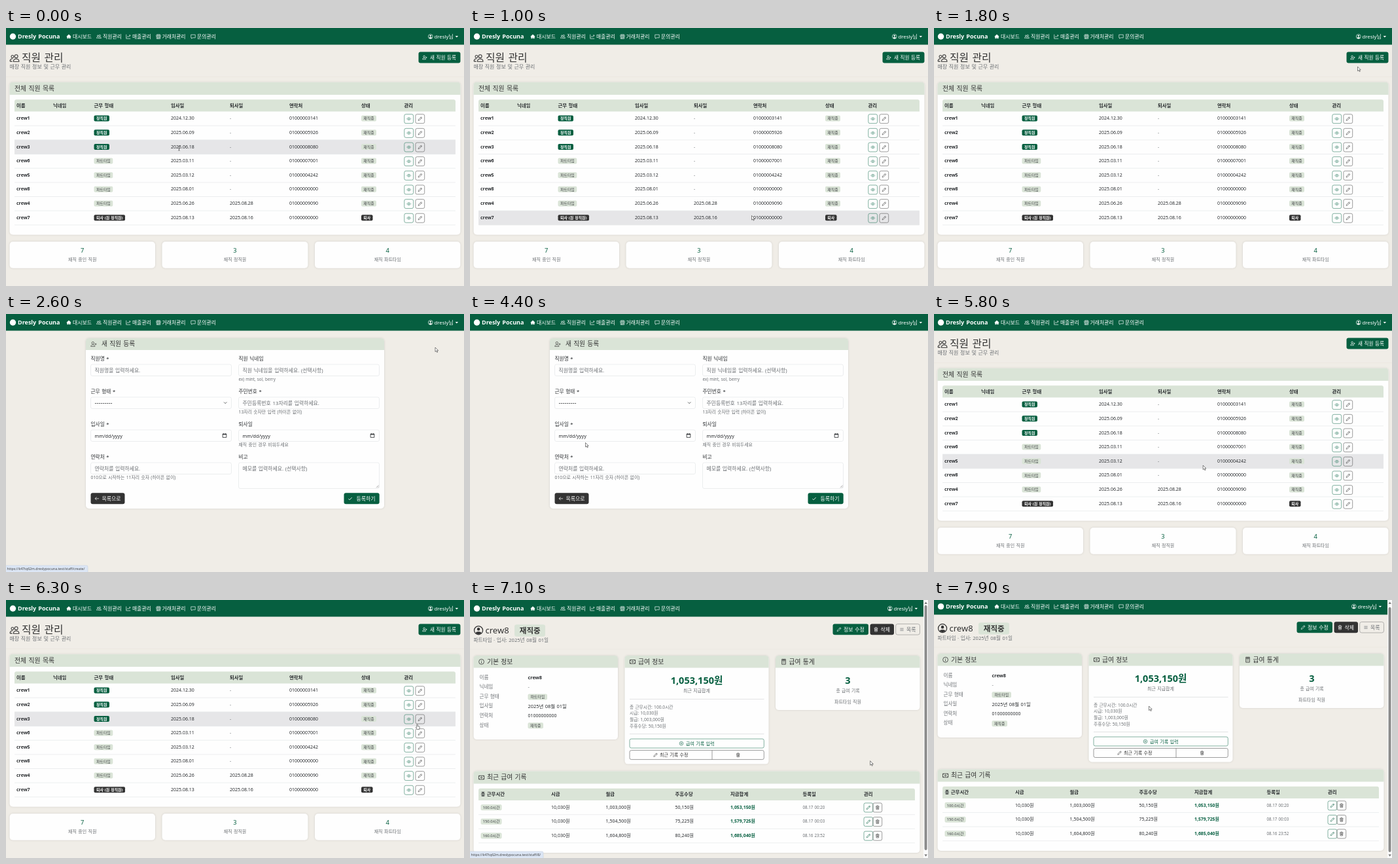
Recreate the animation shown at these times as an HTML page. Size 700 by 394 pixels, loop 8000 ms.

```html
<!DOCTYPE html>
<html lang="ko">
<head>
<meta charset="utf-8">
<title>직원 관리</title>
<style>
html,body{margin:0;height:100%;overflow:hidden;background:#f0ede7}
svg{display:block;width:100vw;height:100vh}
text{font-family:"Noto Sans","Noto Sans CJK KR",sans-serif;word-spacing:.08em;white-space:pre}
.card{filter:drop-shadow(0 .8px 1.8px rgba(0,0,0,.13))}
</style>
</head>
<body>
<svg id="stage" viewBox="0 0 700 394" xmlns="http://www.w3.org/2000/svg"></svg>
<script>
const GREEN = '#065f40', PALE = '#dae4d7', DARK = '#333', INK = '#292c2f', GRAY = '#6b6f73', LINE = '#dfe2e4', WHITE = '#fefefe';
const EDGE_GREEN = '#2f7d62', EDGE_GRAY = '#5c5c5c';
const BRAND = 'Dresly Pocuna', ACCOUNT = 'dresly', SITE = 'https://k47tq62m.dreslypocuna.test/staff/';
const ROW_TOP = 127.6, ROW_H = 21.65, MAX_SCROLL = 3.1;

// Icons on a 16-unit grid
const ICONS = {
  people: 'M8.2 5a2.6 2.6 0 1 0 5.2 0a2.6 2.6 0 1 0-5.2 0M6.2 13.5c0-5.6 9.2-5.6 9.2 0zM2.6 5.6a2.1 2.1 0 1 0 4.2 0a2.1 2.1 0 1 0-4.2 0M.6 13.2c0-3 1.6-4.2 4.4-4.2M.6 13.2h3.8',
  addUser: 'M3 5a3 3 0 1 0 6 0a3 3 0 1 0-6 0M.8 14c0-6 10.4-6 10.4 0zM13 5.5v5M10.5 8h5',
  ring: 'M.8 8a7.2 7.2 0 1 0 14.4 0a7.2 7.2 0 1 0-14.4 0',
  bust: 'M5.5 6a2.5 2.5 0 1 0 5 0a2.5 2.5 0 1 0-5 0M3 12.6c1-3.2 9-3.2 10 0q-5 4-10 0z',
  home: 'M1 8L8 1.5L15 8H13V14H9.5V10H6.5V14H3V8z',
  chart: 'M1 1v14h14M3 11l3.5-4 3 2.5L14 3.5M10.5 3.5H14V7',
  shop: 'M2.5 1.5h11l1.7 4v1.2H.8V5.5zM2 7v8h12V7M5 15v-5h3v5M10 10h2v2h-2zM5 2v4M8 2v4M11 2v4',
  chat: 'M1 2h14v10H6l-3 3v-3H1z',
  eye: 'M.8 8c3.5-6 10.9-6 14.4 0c-3.5 6-10.9 6-14.4 0zM5.8 8a2.2 2.2 0 1 0 4.4 0a2.2 2.2 0 1 0-4.4 0',
  pencil: 'M1.5 14.5l1-4L12 1l3 3-9.5 9.5zM10 3l3 3',
  trash: 'M1.5 3.5h13M5.5 3V1h5v2M3 3.5l.8 11.5h8.4L13 3.5M6 6v6.5M8 6v6.5M10 6v6.5',
  list: 'M2 4h12M2 8h12M2 12h12',
  info: 'M1 8a7 7 0 1 0 14 0a7 7 0 1 0-14 0M8 7v5M8 4v1.3',
  plus: 'M1 8a7 7 0 1 0 14 0a7 7 0 1 0-14 0M8 4.5v7M4.5 8h7',
  cash: 'M.8 3h14.4v10H.8zM6 8a2 2 0 1 0 4 0a2 2 0 1 0-4 0M1 6l2-3M15 10l-2 3M1 10l2 3M15 6l-2-3',
  calc: 'M3 1h10v14H3zM5 3h6v2.5H5zM5 8.5h1M7.5 8.5h1M10 8.5h1M5 11.5h1M7.5 11.5h1M10 11.5h1',
  back: 'M15 8H1.5M7 2.5L1.5 8L7 13.5',
  check: 'M2 8.5l4 4L14 4',
  down: 'M2 5l6 6 6-6',
  date: 'M2 3h12v11H2zM2 4.5h12M4.5 1v2M11.5 1v2M2 3.7h12'
};

const icon = (name, cx, cy, size, color, fill = 'none', weight = 1.4) =>
  `<path d="${ICONS[name]}" transform="translate(${cx - size / 2} ${cy - size / 2}) scale(${size / 16})" fill="${fill}" stroke="${color}" stroke-width="${weight}"/>`;
const userIcon = (cx, cy, size, color) => icon('ring', cx, cy, size, color) + icon('bust', cx, cy, size, 'none', color);
const text = (x, y, s, size = 7.4, fill = INK, weight = 400, anchor = 'start') =>
  `<text x="${x}" y="${y}" font-size="${size}" fill="${fill}" font-weight="${weight}" text-anchor="${anchor}">${s}</text>`;
const bold = (x, y, s, size = 7.4, fill = INK) => text(x, y, s, size, fill, 700);
const mid = (x, y, s, size, fill = GRAY, weight = 400) => text(x, y, s, size, fill, weight, 'middle');
const box = (x, y, x2, y2, fill, r = 0, stroke = 'none', extra = '') =>
  `<rect x="${x}" y="${y}" width="${x2 - x}" height="${y2 - y}" rx="${r}" fill="${fill}" stroke="${stroke}" stroke-width=".6" ${extra}/>`;
const rule = (x, x2, y, color = LINE) => `<path d="M${x} ${y}H${x2}" stroke="${color}" stroke-width=".6"/>`;
const topBar = (x, y, x2, y2, r) =>
  `<path d="M${x} ${y2}V${y + r}q0 ${-r} ${r} ${-r}H${x2 - r}q${r} 0 ${r} ${r}V${y2}z" fill="${PALE}"/>`;
const card = (x, y, x2, y2, headY) =>
  box(x, y, x2, y2, WHITE, 5, 'none', 'class="card"') + (headY ? topBar(x, y, x2, headY, 5) : '');
const iconButton = (x, cy, name, edge, color) =>
  box(x, cy - 7, x + 13.8, cy + 7, 'none', 2.4, edge) + icon(name, x + 6.9, cy, 6.6, color);

function badge(x, cy, x2, label, kind = 'pale') {
  const fill = { pale: PALE, green: GREEN, dark: DARK }[kind], pale = kind == 'pale';
  return box(x, cy - 4.6, x2, cy + 4.4, fill, 2) + mid((x + x2) / 2, cy + 2.1, label, 5.9, pale ? '#3c3f42' : '#fff', pale ? 500 : 700);
}

function nav(right) {
  const items = [['home', 96, 102, '대시보드'], ['people', 142, 148, '직원관리'], ['chart', 187, 193, '매출관리'], ['shop', 233, 238.5, '거래처관리'], ['chat', 286, 292, '문의관리']];
  return box(0, -4, 700, 25.5, GREEN) + '<circle cx="10.5" cy="13" r="4.7" fill="#fff"/>' +
    bold(18, 16.4, BRAND, 9, '#fff') +
    items.map(([name, cx, x, s]) => icon(name, cx, 13, 7.4, '#fff', name == 'home' ? '#fff' : 'none') + text(x, 15.9, s, 7.85, '#fff')).join('') +
    `<g transform="translate(${right} 0)">` + userIcon(648.8, 13, 7.6, '#fff') + text(654.5, 15.9, ACCOUNT + '님', 7.8, '#fff') +
    '<path d="M686.7 12h4.4l-2.2 2.4z" fill="#fff"/></g>';
}

function listPage() {
  const cols = [16, 72, 134.5, 252, 342, 433, 543, 608.5];
  const heads = ['이름', '닉네임', '근무 형태', '입사일', '퇴사일', '연락처', '상태', '관리'];
  const staff = [
    [1, 'full', '2024.12.30', '-', 3141], [2, 'full', '2025.06.09', '-', 5926],
    [3, 'full', '2025.06.18', '-', 8080], [6, 'part', '2025.03.11', '-', 7001],
    [5, 'part', '2025.03.12', '-', 4242], [8, 'part', '2025.08.01', '-', '0000'],
    [4, 'part', '2025.06.26', '2025.08.28', 9090], [7, 'left', '2025.08.13', '2025.08.16', '0000']];
  const types = { full: [158, '정직원', 'green'], part: [163.3, '파트타임', 'pale'], left: [182, '퇴사 (원 정직원)', 'dark'] };
  const rows = staff.map(([id, type, start, end, phone], i) => {
    const top = ROW_TOP + i * ROW_H, cy = top + 10.6, y = cy + 2;
    return rule(13, 687, top + ROW_H) + bold(16, y, 'crew' + id, 7) + badge(134.5, cy, ...types[type]) +
      text(252, y, start, 7) + text(342, y, end, 7, end == '-' ? GRAY : INK) + text(433, y, '0100000' + phone, 7) +
      (type == 'left' ? badge(543, cy, 560.5, '퇴사', 'dark') : badge(543, cy, 566, '재직중')) +
      iconButton(608.8, cy + .5, 'eye', EDGE_GREEN, EDGE_GREEN) + iconButton(625.9, cy + .5, 'pencil', EDGE_GRAY, DARK);
  }).join('');
  const stats = [[5.5, 228, 7, '재직 중인 직원'], [238.5, 461.5, 3, '재직 정직원'], [472, 694.5, 4, '재직 파트타임']];
  return rule(0, 700, 74.6, '#e7e4dd') + nav(0) + icon('people', 13, 46, 15, DARK, 'none', 1.1) + text(24, 51.3, '직원 관리', 15.8, DARK) +
    text(5.5, 62, '매장 직원 정보 및 근무 관리', 7.95, GRAY) +
    box(630.5, 36.5, 694.5, 53.4, GREEN, 3) + icon('addUser', 640, 45, 7.5, '#fff') + text(648, 47.8, '새 직원 등록', 7.6, '#fff') +
    card(5.5, 82.7, 694.5, 315.7, 102) + text(13, 95.6, '전체 직원 목록', 9.85, DARK) +
    topBar(13, 109.3, 687, ROW_TOP, 3) + heads.map((s, i) => bold(cols[i], 120.6, s)).join('') +
    box(13, ROW_TOP, 687, ROW_TOP + ROW_H, '#e6e6e8', 0, 'none', 'id="hover"') + rows +
    stats.map(([x, x2, n, s]) => card(x, 326.3, x2, 366.7) + mid((x + x2) / 2, 343, n, 9.3, GREEN) + mid((x + x2) / 2, 356.4, s, 7)).join('');
}

function formPage() {
  const fields = [
    ['직원명 *', '직원명을 입력하세요.', ''], ['직원 닉네임', '직원 닉네임을 입력하세요. (선택사항)', 'ex) mint, sol, berry'],
    ['근무 형태 *', '---------', ''], ['주민번호 *', '주민등록번호 13자리를 입력하세요.', '13자리 숫자만 입력 (하이픈 없이)'],
    ['입사일 *', 'mm/dd/yyyy', ''], ['퇴사일', 'mm/dd/yyyy', '재직 중인 경우 비워두세요'],
    ['연락처 *', '연락처를 입력하세요.', '010으로 시작하는 11자리 숫자 (하이픈 없이)'], ['비고', '메모를 입력하세요. (선택사항)', '']];
  const form = fields.map(([label, hint, note], i) => {
    const x = i % 2 ? 355.5 : 129.5, y = 77 + 50 * (i >> 1), isDate = hint[0] == 'm', isSelect = hint[0] == '-';
    return text(x, y - 6.5, label, 7.7) + box(x, y, x + 215, y + (i == 7 ? 39.5 : 17.5), WHITE, 2.5, LINE) +
      text(x + 6, y + 11.5, hint, isDate ? 7.2 : isSelect ? 9.3 : 7.85, isDate || isSelect ? INK : GRAY) +
      text(x, y + 25.1, note, i == 1 ? 6.3 : 6.85, GRAY) +
      (isDate ? icon('date', x + 204.5, y + 8.6, 7.6, INK, 'none', 1.7) : '') +
      (isSelect ? icon('down', x + 205.7, y + 8.6, 5.8, INK, 'none', 2) : '');
  }).join('');
  return nav(0) + card(122, 37, 578, 297.3, 55) + icon('addUser', 134, 46, 9.5, DARK, 'none', 1.1) + text(146, 49.3, '새 직원 등록', 9.7, DARK) + form +
    '<path d="M566 265.2l3.7-3.7M568.2 265.2l1.5-1.5" stroke="#777" stroke-width=".6"/>' +
    box(129.5, 273.3, 181.5, 290.3, DARK, 3) + icon('back', 139, 281.9, 7, '#fff', 'none', 1.6) + text(146.5, 284.8, '목록으로', 7.9, '#fff') +
    box(516.5, 273.3, 570.7, 290.3, GREEN, 3) + icon('check', 526, 281.9, 7, '#fff', 'none', 1.9) + text(535.5, 284.8, '등록하기', 7.9, '#fff');
}

function detailPage() {
  const facts = [['이름', bold(88.5, 117.7, 'crew8', 7.3)], ['닉네임', text(88.5, 132.2, '-', 7.3, GRAY)], ['근무 형태', badge(88.5, 144.9, 118, '파트타임')],
    ['입사일', text(88.5, 161.5, '2025년 08월 01일')], ['연락처', text(88.5, 175.9, '01000000000', 7)], ['상태', badge(88.5, 188.8, 112, '재직중')]];
  const pay = ['총 근무시간: 100.0시간', '시급: 10,030원', '월급: 1,003,000원', '주휴수당: 50,150원'];
  const cols = [16.5, 124, 207.5, 313.5, 398, 508.5, 602];
  const heads = ['총 근무시간', '시급', '월급', '주휴수당', '지급합계', '등록일', '관리'];
  const records = [['100.0', '1,003,000', '50,150', '1,053,150', '08.17 00:20'], ['150.0', '1,504,500', '75,225', '1,579,725', '08.17 00:03'], ['160.0', '1,604,800', '80,240', '1,685,040', '08.16 23:52']];
  const table = records.map(([hours, base, extra, sum, when], i) => {
    const cy = 313.7 + i * 21.6, y = cy + 2;
    return badge(16.5, cy, 48.5, hours + '시간') + text(124, y, '10,030원', 7) + text(207.5, y, base + '원', 7) + text(313.5, y, extra + '원', 7) +
      bold(398, y, sum + '원', 6.9, GREEN) + text(508.5, y, when, 6.2, GRAY) +
      iconButton(602, cy + .2, 'pencil', EDGE_GREEN, GREEN) + iconButton(615.9, cy + .2, 'trash', EDGE_GRAY, DARK) + rule(13, 680, cy + 10.9);
  }).join('');
  const title = (name, cx, x, y, s) => icon(name, cx, y - 3.4, 9, DARK) + text(x, y, s, 9.75, DARK);
  return `<g transform="translate(0 ${-MAX_SCROLL})">${nav(-7)}</g>` + rule(0, 693, 72, '#e7e4dd') +
    userIcon(13, 43.2, 14.5, DARK) + text(23.5, 48.2, 'crew8', 13, DARK) +
    box(68, 34.5, 115, 52.6, PALE, 3) + mid(91.7, 47.8, '재직중', 11.5, DARK, 700) +
    text(5.5, 61, '파트타임 · 입사: 2025년 08월 01일', 7.6, GRAY) +
    box(554.5, 33.3, 609, 50.2, GREEN, 3) + icon('pencil', 564, 41.9, 7, '#fff') + text(571, 44.7, '정보 수정', 7.9, '#fff') +
    box(611.5, 33.3, 648, 50.2, DARK, 3) + icon('trash', 620.5, 41.9, 7, '#fff') + text(627.5, 44.7, '삭제', 7.9, '#fff') +
    box(650.7, 33.5, 687.5, 50, 'none', 3, '#888') + icon('list', 660, 41.9, 7, GRAY) + text(667, 44.7, '목록', 7.9, GRAY) +
    card(5.5, 82, 226, 210, 100.5) + title('info', 17.5, 26, 94.6, '기본 정보') +
    facts.map(([s, value], i) => text(14.5, 117.7 + i * 14.55, s, 7.5, GRAY) + value).join('') +
    card(236.5, 82, 456.5, 247.5, 100.5) + title('cash', 248.5, 257, 94.6, '급여 정보') +
    mid(346.5, 124.7, '1,053,150원', 14.5, GREEN, 700) + mid(346.5, 137.9, '최근 지급합계', 7) + rule(244, 449.5, 148.3, '#cfd1d2') +
    pay.map((s, i) => text(244, 162.6 + i * 9.8, s, 6.7, GRAY)).join('') + rule(244, 449.5, 201.5, '#cfd1d2') +
    box(244, 209, 449.3, 222.9, 'none', 2.5, EDGE_GREEN) + icon('plus', 323, 216, 6.5, GREEN) + text(330, 218.5, '급여 기록 입력', 7, GREEN) +
    box(244, 226.5, 449.3, 240.5, 'none', 2.5, EDGE_GRAY) + `<path d="M370 226.5v14" stroke="${EDGE_GRAY}" stroke-width=".6"/>` +
    icon('pencil', 283.5, 233.6, 6.5, DARK) + text(290, 236.1, '최근 기록 수정', 7, DARK) + icon('trash', 409.7, 233.6, 6.5, DARK) +
    card(467, 82, 687.5, 165, 100.5) + title('calc', 479.5, 487.5, 94.6, '급여 통계') +
    mid(577.5, 124.9, '3', 14.5, GREEN, 700) + mid(577.5, 137.9, '총 급여 기록', 6.8) + mid(577.5, 155.4, '파트타임 직원', 7) +
    card(5.5, 258.5, 687.5, 383, 277.5) + title('cash', 17.5, 26, 271.4, '최근 급여 기록') +
    topBar(13, 284.7, 680, 303, 3) + heads.map((s, i) => bold(cols[i], 296.4, s)).join('') + table;
}

const scrollbar = box(693, 0, 700, 394, '#fafafa') + box(694.6, 8, 698.6, 382, '#8b8b8b', 2, 'none', 'id="thumb"') +
  '<path d="M694.5 6l2.2-3.2 2.2 3.2zM694.5 388.5l2.2 3.2 2.2-3.2z" fill="#777"/>';

const pointers = `
<g id="arrow"><path d="M0 0V6.6L1.6 5.2L2.7 7.6L3.8 7.1L2.7 4.8H4.7z" fill="#fff" stroke="#222" stroke-width=".55"/></g>
<g id="beam"><path d="M-1.2-3.2Q0-3.2 0-2.6Q0-3.2 1.2-3.2M0-2.6V2.6M-1.2 3.2Q0 3.2 0 2.6Q0 3.2 1.2 3.2" fill="none" stroke="#222" stroke-width=".6"/></g>
<g id="hand"><path d="M-.7 .6Q0-.4 .7 .6V3.2L3.3 3.8Q4 4 3.8 5L3.2 8H-.2L-2.3 5.2Q-2.2 4.3-.7 5z" fill="#fff" stroke="#222" stroke-width=".55"/></g>`;

document.getElementById('stage').innerHTML = box(0, 0, 700, 394, '#f0ede7') +
  `<g id="list">${listPage()}</g><g id="form">${formPage()}</g><g id="detail"><g id="scroll">${detailPage()}</g>${scrollbar}</g>` +
  `<g id="status"><path id="bubble" fill="#dce6f5" stroke="#c3cddc" stroke-width=".5"/><text id="link" x="1.5" y="391" font-size="5.2" fill="#444"></text></g>` +
  `<g id="pointer">${pointers}</g>`;

const $ = id => document.getElementById(id);
const show = (id, on) => $(id).setAttribute('display', on ? 'inline' : 'none');
const ease = p => p * p * (3 - 2 * p);
const clamp = p => Math.min(1, Math.max(0, p));

const PATH = [[0, 264.5, 184], [200, 264.5, 184], [900, 430.5, 286.5], [1200, 430.5, 286.5], [1900, 660, 46], [2300, 660, 46], [2550, 656, 51], [3000, 656, 51],
  [4250, 176.5, 196.5], [4420, 176.5, 196.5], [4700, 150, 281], [5350, 150, 281], [6200, 628.5, 189.5], [6320, 628.5, 189.5], [6650, 616, 247], [7050, 616, 247], [7750, 328.5, 162], [8000, 328.5, 162]];
const LINKS = [[1950, 2900, 'create/', 125], [4700, 5600, '', 107.5], [6600, 7400, '8/', 112]];
const HAND_TIMES = [[1850, 2400], [4640, 5000], [6180, 6900]];

function pointerAt(t) {
  const i = PATH.findIndex(k => k[0] > t), [t0, x0, y0] = PATH[i - 1], [t1, x1, y1] = PATH[i];
  const p = ease((t - t0) / (t1 - t0));
  return [x0 + (x1 - x0) * p, y0 + (y1 - y0) * p];
}

function draw(t) {
  const page = t >= 6900 ? 'detail' : t >= 2400 && t < 5000 ? 'form' : 'list';
  ['list', 'form', 'detail'].forEach(id => show(id, id == page));

  const during = ([a, b]) => t >= a && t < b;
  const [x, y] = pointerAt(t);
  const kind = t < 250 ? 'beam' : HAND_TIMES.some(during) ? 'hand' : 'arrow';
  ['arrow', 'beam', 'hand'].forEach(id => show(id, id == kind));
  $('pointer').setAttribute('transform', `translate(${x} ${y})`);

  const row = Math.floor((y - ROW_TOP) / ROW_H);
  show('hover', page == 'list' && row >= 0 && row < 8);
  $('hover').setAttribute('y', ROW_TOP + row * ROW_H);

  const link = LINKS.find(during);
  show('status', link);
  if (link) {
    $('bubble').setAttribute('d', `M-1 384H${link[3] - 2}q2 0 2 2V395H-1z`);
    $('link').textContent = SITE + link[2];
  }

  const scrolled = ease(clamp((t - 7400) / 200));
  $('scroll').setAttribute('transform', `translate(0 ${MAX_SCROLL * (1 - scrolled)})`);
  $('thumb').setAttribute('y', 8 + 3 * scrolled);
}

const start = performance.now();
function tick() {
  draw((performance.now() - start) % 8000);
  requestAnimationFrame(tick);
}
tick();
</script>
</body>
</html>
```
